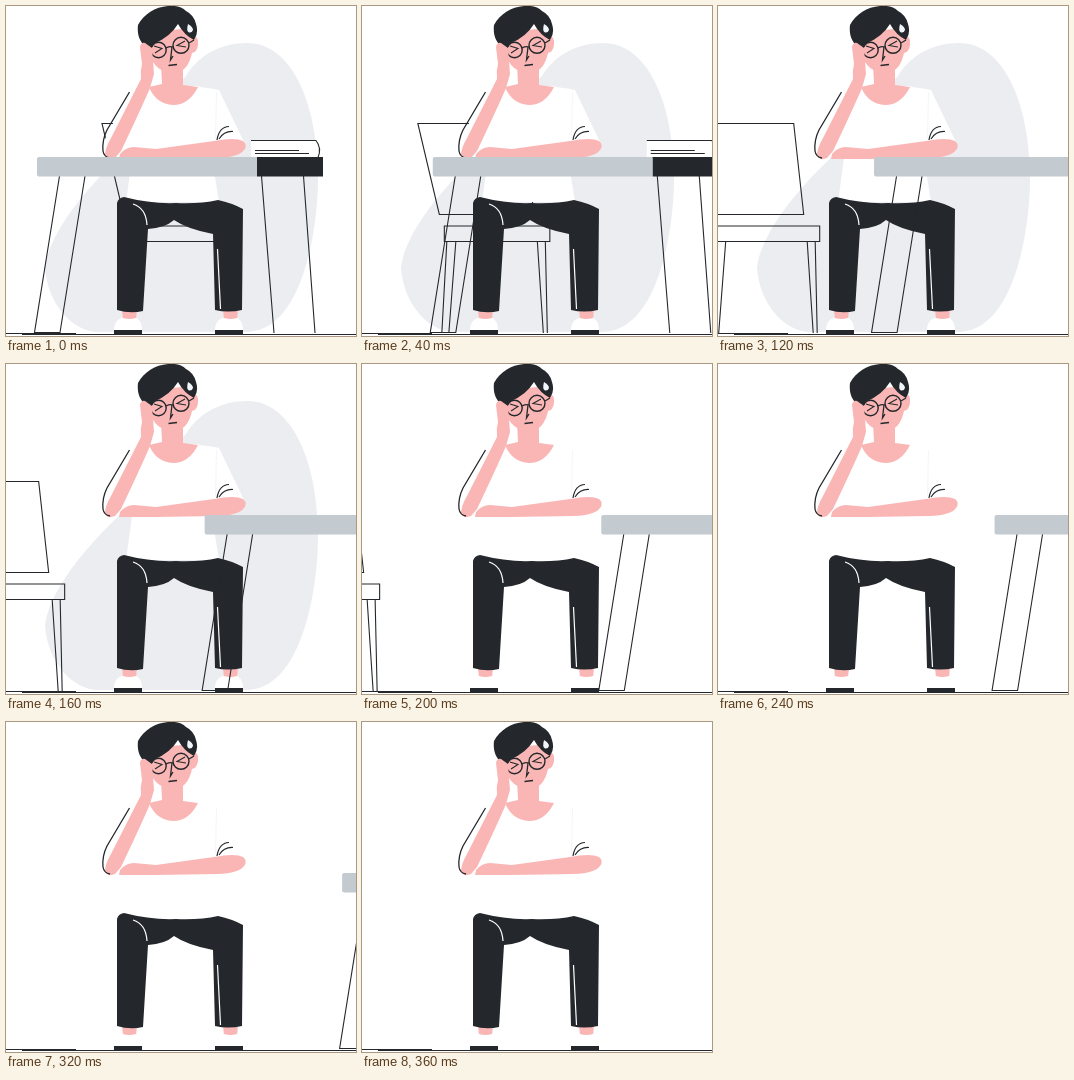
An HTML page with a canvas that plays this animation: 350 by 330 pixels, repeating every 0.48 s.

```html
<!DOCTYPE html>
<html lang="en">
<head>
<meta charset="utf-8">
<title>Tired at the desk</title>
<style>
  html, body { margin: 0; width: 100%; height: 100%; overflow: hidden; background: #fff; }
  canvas { display: block; }
</style>
</head>
<body>
<canvas id="stage" width="350" height="330"></canvas>
<script>
const ctx = document.getElementById('stage').getContext('2d');
const DARK = '#24282c', SKIN = '#fab6b5', BLOB = '#ecedf1', STEEL = '#c3cad0', WHITE = '#fff';
const LOOP = 480, STEP = 40, LAST_STEP = 9, BLOB_STEPS = 5;

function fill(path, color) {
  ctx.fillStyle = color;
  ctx.fill(new Path2D(path));
}

function stroke(path, width = 1.1, color = DARK) {
  ctx.strokeStyle = color;
  ctx.lineWidth = width;
  ctx.stroke(new Path2D(path));
}

function ring(x, y, radius, width) {
  ctx.strokeStyle = DARK;
  ctx.lineWidth = width;
  ctx.beginPath();
  ctx.arc(x, y, radius, 0, Math.PI * 2);
  ctx.stroke();
}

function shifted(dx, draw) {
  ctx.save();
  ctx.translate(dx, 0);
  draw();
  ctx.restore();
}

// Distance the furniture has slid: one arc of a sine, fastest near step 2.65.
function slide(step) {
  const rate = 0.185, peak = 2.65;
  return 233.5 * (Math.sin(rate * (step - peak)) + Math.sin(rate * peak));
}

function drawBlob() {
  fill(`M241 37C287 37 312 100 312 172C312 225 296 326 240 326H92
    C68 326 42 300 39 262C42 232 72 190 115 150C150 118 160 90 180 70
    C192 50 214 37 241 37Z`, BLOB);
}

function drawGround() {
  stroke('M0 327.5H70M16 328.5H350', 1);
}

function drawChair() {
  stroke('M96 117.5H202L212 208.5H117.5Z');
  stroke('M122.5 220H228V235.5H122.5Z');
  stroke('M125 235.5L120 327M134 235.5L127 327');
  stroke('M215.5 235.5L221.5 327M223.5 235.5L225.5 327');
}

function drawShoe() {
  fill('M116 303H131L130 314H117Z', SKIN);
  fill('M108 324C108 317 112 312 117 312Q123 314 130 312C134 314 136 318 136 324Z', WHITE);
  fill('M108 324H136V328.5H108Z', DARK);
}

function drawBody() {
  drawShoe();
  shifted(101, drawShoe);
  fill(`M143 80C134 82 128 83 123 86L98 135L101 151L126 152L120 196H213L206 152
    L239 138L213 84C205 82 198 82 190 80Z`, WHITE);
  stroke('M210.5 86L209.5 132', 0.7, '#f0f1f4');
  fill(`M118 191Q145 198 170 197Q194 198 212 194Q226 197 237 203L236 304Q222 307 209 304L207 228
    Q181 223 168 214Q159 222 142 223L137 305Q124 308 111 304V197Q112 192 118 191Z`, DARK);
  stroke('M127 198Q140 202 141 219M211.5 243L214.5 303', 1.2, WHITE);
}

function drawHead() {
  fill('M155 58H177V79L192 81Q183 99 167 99Q150 98 143 81L156 78Z', SKIN);
  fill('M143 26L187 22L188 30Q193 31 192 39Q191 46 186 47Q182 66 168 67Q148 66 144 48Z', SKIN);
  fill(`M139 40C133 35 131 27 132 19C138 8 149 1 162 0Q174 -1 180 5Q188 9 190 18
    Q193 27 188 34Q178 29 172 18Q164 31 149 37L145 43Z`, DARK);
  fill('M182 18Q187 21 187 24Q186 27 183 26.5Q180 25 182 18Z', '#f1f6fa');
  ring(152.5, 44, 7.7, 1.4);
  ring(175, 39.3, 8, 1.4);
  stroke('M160 42Q164 40 167 41M183 37L188 34', 1.3);
  stroke('M148 40L156 42.5L149 47M179 35L171 39.5L180 41', 1.1);
  stroke('M166 41L164.5 54L167 50M162.5 59.5L171 58.5', 1.3);
}

function drawArms() {
  fill(`M134 41Q135 36 139 37L146 42L147 55L148 68L144 82Q135 103 115 145L109 152
    Q102 155 99 150Q99 142 105 132L135 73Q134 65 136 58Z`, SKIN);
  stroke('M123.5 86L101 124Q96 134 97 145Q98 151 104 152', 1.3);
  fill(`M113 153L114 148Q120 141 128 141L150 143L208 135Q229 131 237 135
    Q242 139 238 144Q233 151 212 152L150 153Z`, SKIN);
  stroke('M211 134Q213 121 223 120.5M213 133Q218 125 227 125.5', 1.2);
}

function drawTable() {
  stroke('M53.5 170L28.5 326.5H54L79 170');
  stroke('M255.5 170L268 327M297.5 170L309 327');
  fill('M245 134H310Q316 142 313 151H245Z', WHITE);
  stroke('M245 134.5H310Q316 142 312 151.5H245M249 144.5H293M249 147.5H303');
  fill('M33 151H251V170.5H33Q31 170.5 31 168.5V153Q31 151 33 151Z', STEEL);
  fill('M251 151H317V170.5H251Z', DARK);
}

function render(time) {
  const step = Math.min(Math.floor((time % LOOP) / STEP), LAST_STEP);
  const offset = slide(step);
  ctx.fillStyle = WHITE;
  ctx.fillRect(0, 0, 350, 330);
  if (step < BLOB_STEPS) drawBlob();
  drawGround();
  shifted(-offset * 1.01, drawChair);
  drawBody();
  drawHead();
  drawArms();
  shifted(offset, drawTable);
}

let start;
function tick(now) {
  start ??= now;
  render(now - start);
  requestAnimationFrame(tick);
}
render(0);
requestAnimationFrame(tick);
</script>
</body>
</html>
```
